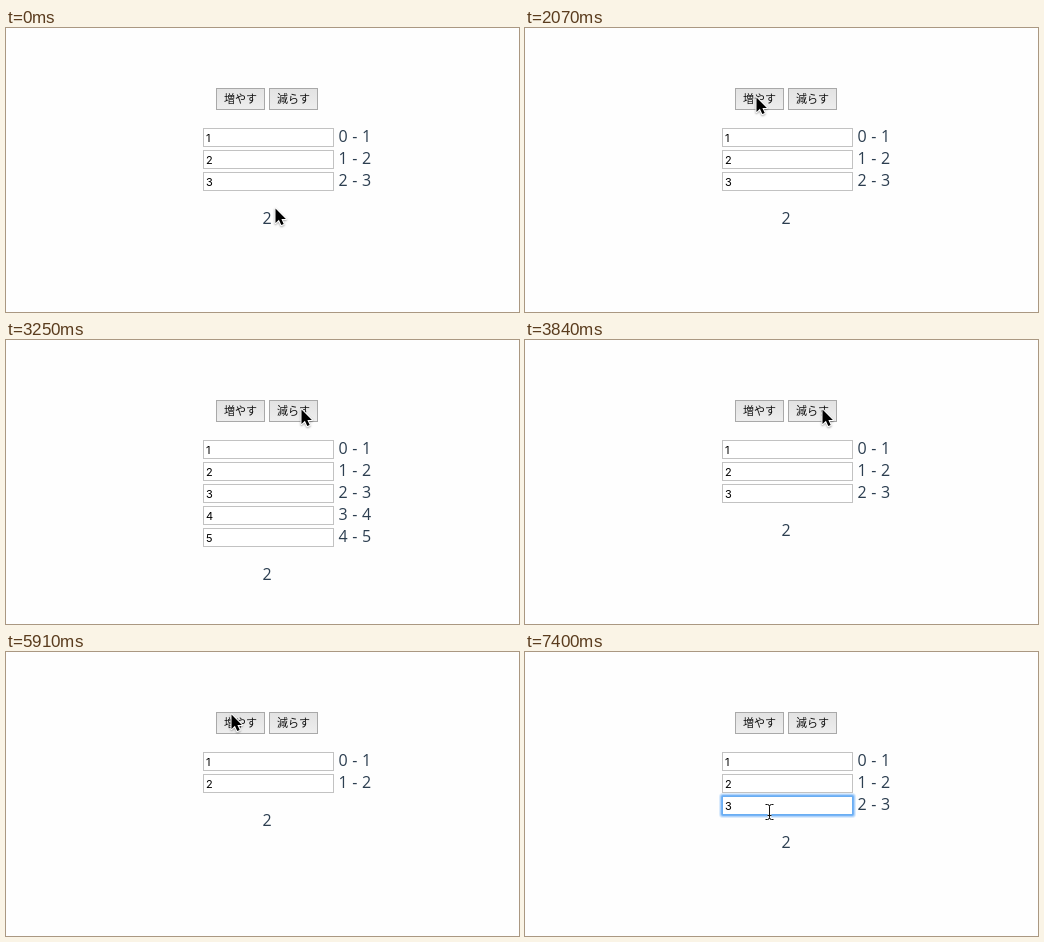
An HTML page with a canvas for the animation above (7.99 s loop, 513 by 284 pixels).

```html
<!DOCTYPE html>
<html lang="ja">
<head>
<meta charset="utf-8">
<style>
html, body { margin: 0; width: 100%; height: 100%; overflow: hidden; background: #fefefe; }
canvas { display: block; width: 513px; height: 284px; }
</style>
</head>
<body>
<canvas id="stage"></canvas>
<script>
const W = 513, H = 284, LOOP = 7990, TICKS = 54, LEAD = 20;
const canvas = document.getElementById('stage');
const ctx = canvas.getContext('2d');
const ratio = window.devicePixelRatio || 1;
canvas.width = W * ratio;
canvas.height = H * ratio;
ctx.scale(ratio, ratio);

const LABEL = '16px "Open Sans", "Noto Sans", sans-serif';
const VALUE = '11px Inter, "Liberation Sans", sans-serif';
const BUTTON = '11px "Noto Sans CJK JP", "Noto Sans CJK", sans-serif';
const INK = '#2c3e50';
const ROW = { x: 197, y: 100, w: 131, h: 19, pitch: 22 };
const FOCUS_TICK = 47, CARET_OFF = 50;

// ticks at which each button goes down; the rows change one tick later
const adds = [15, 19, 39, 42];
const removes = [23, 25, 29, 32];

// pointer moves, each easing out to its end point
const moves = [
  { from: 1, to: 3, x: 269, y: 163 },
  { from: 4, to: 9, x: 233, y: 73 },
  { from: 13, to: 14, x: 231, y: 69 },
  { from: 20, to: 23, x: 297, y: 69 },
  { from: 34, to: 39, x: 225, y: 62 },
  { from: 43, to: 48, x: 244, y: 160 }
];

const easeOut = k => 1 - (1 - k) ** 3;
const before = (list, tick) => list.filter(t => t < tick).length;

function pointerAt(tick) {
  let x = 269, y = 180;
  for (const m of moves) {
    const k = easeOut(Math.min(1, Math.max(0, (tick - m.from) / (m.to - m.from))));
    x += (m.x - x) * k;
    y += (m.y - y) * k;
  }
  return { x: Math.round(x), y: Math.round(y) };
}

function text(str, x, y, font, color, align = 'left') {
  ctx.font = font;
  ctx.fillStyle = color;
  ctx.textAlign = align;
  ctx.fillText(str, x, y);
}

function box(x, y, w, h, fill, border) {
  ctx.fillStyle = fill;
  ctx.fillRect(x, y, w, h);
  ctx.strokeStyle = border;
  ctx.lineWidth = 1;
  ctx.strokeRect(x + 0.5, y + 0.5, w - 1, h - 1);
}

function button(x, label, down) {
  const g = ctx.createLinearGradient(0, 60, 0, 82);
  g.addColorStop(0, down ? '#c4c4c4' : '#e2e2e2');
  g.addColorStop(1, down ? '#d2d2d2' : '#eeeeee');
  box(x, 60, 49, 22, g, '#a9a9a9');
  text(label, x + 24.5, 75, BUTTON, '#111', 'center');
}

function focusRing(x, y, w, h) {
  for (let d = 3; d > 0; d--) {
    ctx.fillStyle = `rgba(80,160,245,${0.6 / d})`;
    ctx.beginPath();
    ctx.roundRect(x - d, y - d, w + 2 * d, h + 2 * d, d + 1);
    ctx.fill();
  }
}

function row(i, focused, caret) {
  const { x, w, h } = ROW, y = ROW.y + i * ROW.pitch;
  if (focused) focusRing(x, y, w, h);
  box(x, y, w, h, '#fff', focused ? '#6aaef2' : '#c2c2c2');
  text(i + 1, x + 3, y + 14, VALUE, '#000');
  if (caret) {
    ctx.fillStyle = '#000';
    ctx.fillRect(207, y + 3, 1, 13);
  }
  ctx.wordSpacing = '0.5px';
  text(`${i} - ${i + 1}`, 332.5, y + 14, LABEL, INK);
  ctx.wordSpacing = '0px';
}

function arrow(x, y) {
  const shape = new Path2D('M0 0V14.5L3.4 11.3L5.8 16.6L8.2 15.6L5.9 10.4H10.4Z');
  ctx.save();
  ctx.translate(x + 0.5, y + 0.5);
  ctx.lineJoin = 'round';
  ctx.shadowColor = 'rgba(0,0,0,.35)';
  ctx.shadowBlur = 2 * ratio;
  ctx.shadowOffsetY = ratio;
  ctx.strokeStyle = '#fff';
  ctx.lineWidth = 2;
  ctx.stroke(shape);
  ctx.shadowColor = 'transparent';
  ctx.fillStyle = '#000';
  ctx.fill(shape);
  ctx.restore();
}

function beam(x, y) {
  const half = 'M-4 -7.5H-2Q0 -7.5 0 -5.5Q0 -7.5 2 -7.5H4M0 -5.5V0';
  const shape = new Path2D(half);
  shape.addPath(new Path2D(half), new DOMMatrix([1, 0, 0, -1, 0, 0]));
  shape.addPath(new Path2D('M-2 3.5H2'));
  ctx.save();
  ctx.translate(x + 0.5, y);
  ctx.strokeStyle = 'rgba(255,255,255,.8)';
  ctx.lineWidth = 2.5;
  ctx.stroke(shape);
  ctx.strokeStyle = '#111';
  ctx.lineWidth = 1;
  ctx.stroke(shape);
  ctx.restore();
}

function overInput(p, count) {
  const dx = p.x - ROW.x, dy = p.y - ROW.y;
  return dx >= 0 && dx < ROW.w && dy >= 0 &&
    dy < count * ROW.pitch && dy % ROW.pitch < ROW.h;
}

function draw(now) {
  const tick = Math.min(TICKS - 1, Math.floor((now % LOOP + LEAD) * TICKS / LOOP));
  const count = 3 + before(adds, tick) - before(removes, tick);

  ctx.fillStyle = '#fefefe';
  ctx.fillRect(0, 0, W, H);
  button(210, '増やす', adds.includes(tick));
  button(263, '減らす', removes.includes(tick));
  for (let i = 0; i < count; i++) {
    const focused = i === 2 && tick >= FOCUS_TICK;
    row(i, focused, focused && tick < CARET_OFF);
  }
  if (count > 1) {
    text('2', 261, 130 + count * ROW.pitch, LABEL, INK, 'center');
  }
  const p = pointerAt(tick);
  (overInput(p, count) ? beam : arrow)(p.x, p.y);
}

let start;
function loop(now) {
  start ??= now;
  draw(now - start);
  requestAnimationFrame(loop);
}
draw(0);
requestAnimationFrame(loop);
</script>
</body>
</html>
```
